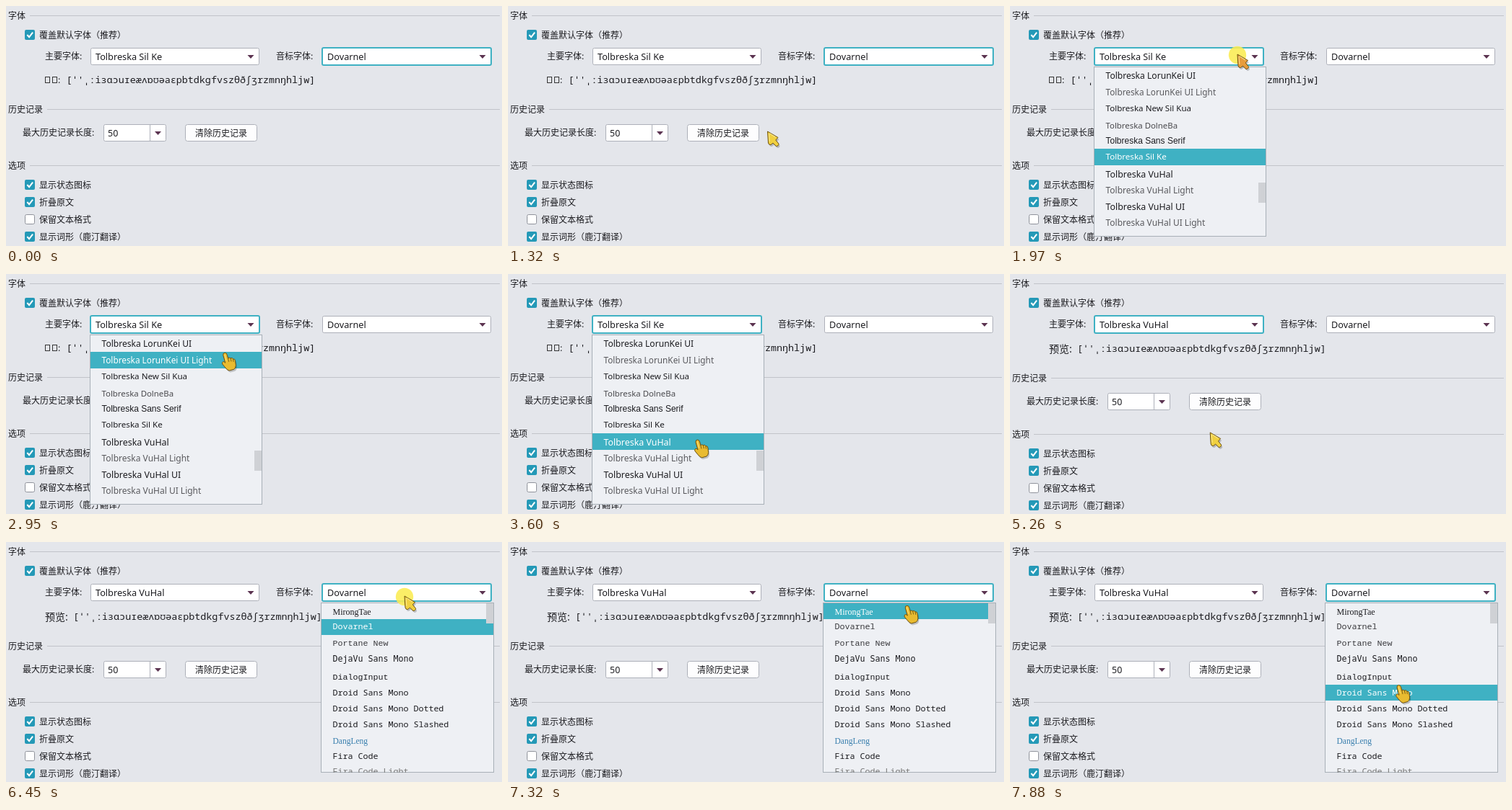
An HTML page for the animation above (8000 ms loop, 687 by 333 pixels).

```html
<!DOCTYPE html>
<html lang="zh">
<head>
<meta charset="utf-8">
<style>
html, body { margin: 0; width: 100%; height: 100%; overflow: hidden; background: #e4e6eb; }
svg { display: block; width: 687px; height: 333px; }
</style>
</head>
<body>
<svg id="stage" viewBox="0 0 687 333" xmlns="http://www.w3.org/2000/svg"></svg>
<script>
const LOOP = 8000;
const CJK = "'Noto Sans CJK SC','Noto Sans',sans-serif";
const SANS = "'Noto Sans','Open Sans',sans-serif";
const MONO = "'Noto Sans Mono','DejaVu Sans Mono',monospace";
const DEJAVU = "'DejaVu Sans Mono',monospace";
const COURIER = "'Liberation Mono',monospace";
const SERIF = "'Liberation Serif',serif";
const ARIAL = "'Liberation Sans',sans-serif";
const INK = '#1c1c20', TEAL = '#3fb1c3', LINE = '#adb0b9';
const PHONES = "[ˈ'ˌːiɜɑɔuɪeæʌɒʊəaɛpbtdkgfvszθðʃʒrzmnŋhljw]";

// Rows: name, text centre, family, size, colour, weight
const leftList = {
  x: 116, w: 239, bar: [344, 245, 28], current: 5,
  edges: [85, 108, 131, 154, 176, 198, 221, 244, 267, 290, 319],
  rows: [
    ['Tolbreska LorunKei UI', 97, SANS, 12.1],
    ['Tolbreska LorunKei UI Light', 120, SANS, 11.8, '#5a5a5e', 300],
    ['Tolbreska New Sil Kua', 142, SANS, 11.6],
    ['Tolbreska DolneBa', 166, SANS, 11.4, '#4a4a4e'],
    ['Tolbreska Sans Serif', 187, ARIAL, 12],
    ['Tolbreska Sil Ke', 209, SANS, 11.6],
    ['Tolbreska VuHal', 233, SANS, 12.4],
    ['Tolbreska VuHal Light', 256, SANS, 12, '#5a5a5e', 300],
    ['Tolbreska VuHal UI', 278, SANS, 12.4],
    ['Tolbreska VuHal UI Light', 301, SANS, 12, '#5a5a5e', 300]
  ]
};
const rightList = {
  x: 436, w: 240, bar: [665, 85, 28], current: 1,
  edges: [85, 107, 129, 151, 174, 198, 220, 242, 264, 287, 308, 319],
  rows: [
    ['MirongTae', 97, SERIF, 12],
    ['Dovarnel', 117, MONO, 11.67, '#3a3a3e'],
    ['Portane New', 140, COURIER, 11.67, '#3a3a3e'],
    ['DejaVu Sans Mono', 162, DEJAVU, 11.63],
    ['DialogInput', 187, COURIER, 11.67],
    ['Droid Sans Mono', 209, MONO, 11.67],
    ['Droid Sans Mono Dotted', 231, MONO, 11.67],
    ['Droid Sans Mono Slashed', 253, MONO, 11.67],
    ['DangLeng', 276, SERIF, 11.5, '#3a7fae'],
    ['Fira Code', 297, MONO, 11.67],
    ['Fira Code Light', 318, MONO, 11.67, '#777', 300]
  ]
};

// Cursor moves: first and last step time, step count, start, end, easing power
const moves = [
  [1100, 1630, 6, 404, 281, 315, 67, 1],
  [2730, 3600, 9, 315, 67, 260, 230, 1],
  [5260, 6020, 8, 260, 229, 552, 75, 0.92],
  [7100, 7880, 8, 552, 75, 536, 198.5, 1.15]
];
const clicks = [[1970, 2080], [4270, 4370], [6450, 6550]];

const within = (t, a, b) => t >= a && t < b;

function cursorAt(t) {
  let pos = null;
  for (const [a, b, n, x0, y0, x1, y1, p] of moves) {
    if (t < a) break;
    const k = Math.min(n - 1, Math.floor((t - a) * (n - 1) / (b - a) + 1e-6));
    const u = Math.pow((k + 1) / n, p), e = u * u * (3 - 2 * u);
    pos = { x: x0 + (x1 - x0) * e, y: y0 + (y1 - y0) * e };
  }
  return pos;
}

const text = (s, x, mid, size = 12, font = CJK, fill = INK, weight = 400) =>
  `<text x="${x}" y="${mid + size * 0.37}" font-family="${font}" font-size="${size}" fill="${fill}" font-weight="${weight}">${s}</text>`;
const rect = (x, y, w, h, fill, stroke = 'none', r = 0, sw = 1) =>
  `<rect x="${x}" y="${y}" width="${w}" height="${h}" rx="${r}" fill="${fill}" stroke="${stroke}" stroke-width="${sw}"/>`;
const path = (d, fill, rest = '') => `<path d="${d}" fill="${fill}" ${rest}/>`;
const arrowDown = (x, y) => path(`M${x - 4.5} ${y}h9l-4.5 5z`, '#5b3350');

function section(title, mid) {
  return text(title, 3, mid + 1) +
    rect(title.length * 12 + 9, mid, 684 - title.length * 12 - 9, 1, '#c1c3c9');
}

function check(label, mid, on) {
  const box = on
    ? rect(26, mid - 7, 14, 14, '#2499b7', 'none', 2) +
      path(`M29.3 ${mid}l2.8 3.2 5-6.6`, 'none', 'stroke="#fff" stroke-width="2"')
    : rect(26.5, mid - 6.5, 13, 13, '#fff', '#8f929b', 2);
  return box + text(label, 46, mid + 0.5);
}

function combo(x, w, label, focus) {
  const box = focus
    ? rect(x, 58, w, 24, '#fff', TEAL, 2, 2)
    : rect(x + 0.5, 58.5, w - 1, 23, '#fff', LINE, 2);
  return box + text(label, x + 7, 70, 12.7, SANS) + arrowDown(x + w - 12, 68);
}

function preview(ready) {
  if (ready) return text('预览:', 54, 104, 14) + text(PHONES, 93, 103, 13.37, MONO);
  return rect(54.5, 98.5, 6, 8, 'none', '#333') + rect(64.5, 98.5, 6, 8, 'none', '#333') +
    text(':', 72, 103) + text(PHONES, 83.5, 102, 13.37, MONO);
}

function popup(list, hover) {
  const { x, w, edges, rows, bar } = list;
  let out = rect(x + 0.5, 84.5, w - 1, 235, '#eef0f4', '#a8b0b7');
  out += rect(x + 1, edges[hover], w - 2, edges[hover + 1] - edges[hover], TEAL);
  rows.forEach(([name, mid, font, size, fill = INK, weight = 400], i) => {
    out += text(name, x + 16.5, mid, size, font, i === hover ? '#fff' : fill, weight);
  });
  out += rect(bar[0], bar[1], 10, bar[2], '#cfd1d5');
  return `<g clip-path="url(#list)">${out}</g>`;
}

function pointer(pos, hand, warm) {
  const edge = 'stroke="#6e5312" stroke-width="1" stroke-linejoin="round"';
  const arrow = 'M0 0L14.5 8.5 11.3 12 15.5 17.2Q15.8 20 12 20.6L7.5 16.2 4.5 18.5Q1.6 19 1 16Z';
  const palm = 'M2 4.5Q1.6 1 4.5 1 6.8 1 7.6 4L8.8 8.6Q10.5 7 12.4 8.6 14.6 7.4 15.8 9.6 18.4 9.2 18.8 12L19.6 18.5Q19.4 22.5 17 24L10.5 25.8Q7.6 25.2 5 21.5L1 16.8Q-.2 14.2 2 13.4 3.6 13 5 15Z';
  const d = hand ? palm : arrow;
  const fill = hand ? '#e9bb30' : warm ? '#e79c3c' : '#f0d040';
  const detail = hand
    ? path('M8.8 8.6l1.2 5M12.4 8.6l.9 4.6M15.8 9.6l.6 4', 'none', 'stroke="#6e5312" stroke-width=".9"') +
      path('M4.2 3.5l2.2 9', 'none', 'stroke="#f8dd78" stroke-width="1.2"')
    : path('M2 3L2.8 14M3 2.8L11 8', 'none', 'stroke="#fbeb9a" stroke-width="1.2" opacity=".8"');
  const dx = hand ? 2 : 0, dy = hand ? 1 : 0;
  return `<g transform="translate(${pos.x - dx} ${pos.y - dy})">` +
    path(d, '#000', 'opacity=".2" transform="translate(1.5 2.5)"') + path(d, fill, edge) + detail + '</g>';
}

function draw(t) {
  const changed = t >= 4270, d = changed ? 1 : 0;
  const leftFocus = within(t, 1970, 6450);
  const list = within(t, 1970, 4270) ? leftList : t >= 6450 ? rightList : null;
  const pos = cursorAt(t);
  const overList = list && pos.y > 85;

  let out = '<defs><clipPath id="list"><rect x="0" y="84" width="687" height="236"/></clipPath></defs>';
  out += rect(0, 0, 687, 333, '#e4e6eb');
  out += section('字体', 13) + check('覆盖默认字体（推荐）', 40, true);
  out += text('主要字体:', 54, 70) + combo(117, 234, changed ? 'Tolbreska VuHal' : 'Tolbreska Sil Ke', leftFocus);
  out += text('音标字体:', 374, 70) + combo(438, 234, 'Dovarnel', !leftFocus);
  out += preview(changed);

  out += `<g transform="translate(0 ${d})">`;
  out += section('历史记录', 143) + text('最大历史记录长度:', 23, 176);
  out += rect(135.5, 164.5, 86, 23, '#fff', LINE, 2) + rect(199, 165, 1, 22, LINE);
  out += text('50', 141, 176, 12.5, SANS) + arrowDown(210.5, 174);
  out += rect(248.5, 164.5, 99, 23, '#fdfdfe', LINE, 3) + text('清除历史记录', 262, 176.5);
  out += section('选项', 221);
  out += check('显示状态图标', 248, true) + check('折叠原文', 272, true);
  out += check('保留文本格式', 296, false) + check('显示词形（鹿汀翻译）', 320, true);
  out += '</g>';

  if (list) {
    const hover = overList
      ? list.edges.findIndex((y, i) => pos.y >= y && pos.y < list.edges[i + 1])
      : list.current;
    out += popup(list, hover);
  }
  if (pos) {
    if (clicks.some(([a, b]) => within(t, a, b))) {
      out += `<circle cx="${pos.x}" cy="${pos.y + 1}" r="12.2" fill="#fbec52" opacity=".88"/>`;
    }
    out += pointer(pos, overList, within(t, 1970, 2730));
  }
  return out;
}

const stage = document.getElementById('stage');
let last = '', start = null;
function tick(now) {
  if (start === null) start = now;
  const next = draw((now - start) % LOOP);
  if (next !== last) stage.innerHTML = last = next;
  requestAnimationFrame(tick);
}
requestAnimationFrame(tick);
</script>
</body>
</html>
```
